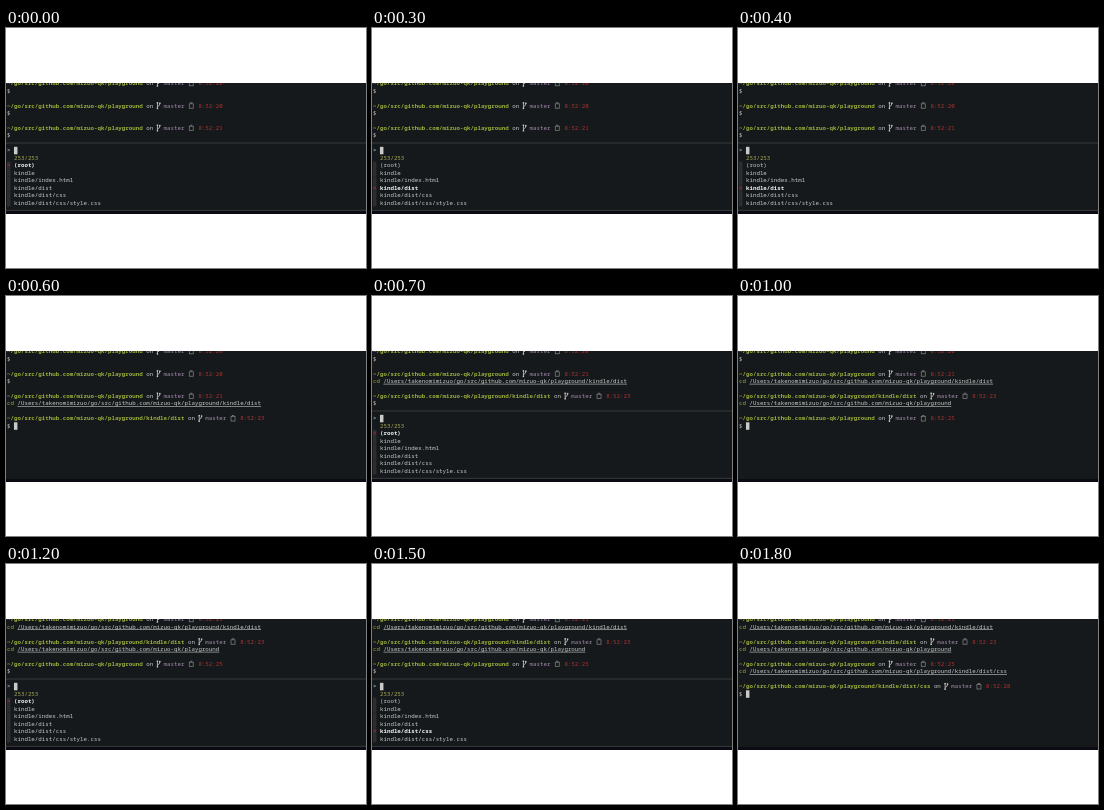
An HTML page with a canvas for the animation above (1.9 s loop, 360 by 240 pixels).

```html
<!DOCTYPE html>
<html lang="en">
<head>
<meta charset="utf-8">
<title>Directory picker in a terminal</title>
<style>
html, body { margin: 0; width: 100%; height: 100%; overflow: hidden; background: #fff; }
canvas { display: block; width: 360px; height: 240px; }
</style>
</head>
<body>
<canvas id="stage"></canvas>
<script>
const canvas = document.getElementById('stage');
const ctx = canvas.getContext('2d');
const ratio = window.devicePixelRatio || 1;
canvas.width = 360 * ratio;
canvas.height = 240 * ratio;

const LOOP = 1900, COL = 3.48, ROW = 7.47, LEFT = 1, TOP = 55, BOTTOM = 183;
const COLOR = {
  back: '#16191b', edge: '#0c0a12', text: '#c9cbca', white: '#f4f4f4',
  green: '#9bad3b', olive: '#a9aa55', purple: '#a58caf', red: '#b0332f',
  grey: '#858887', border: '#43484a', gutter: '#2b2e30', prompt: '#93aebd', pointer: '#b3263f'
};

const REPO = 'go/src/github.com/mizuo-qk/playground';
const HOME = '/Users/takenomimizuo/';
const ENTRIES = ['(root)', 'kindle', 'kindle/index.html', 'kindle/dist',
  'kindle/dist/css', 'kindle/dist/css/style.css'];

// Each prompt: folder below the repository, seconds, folder changed to.
const PROMPTS = [
  { dir: '', sec: 20 },
  { dir: '', sec: 20 },
  { dir: '', sec: 21, cd: '/kindle/dist' },
  { dir: '/kindle/dist', sec: 23, cd: '' },
  { dir: '', sec: 25, cd: '/kindle/dist/css' },
  { dir: '/kindle/dist/css', sec: 28 }
];

// pick is the selected entry; without it the picker is closed.
const STEPS = [
  { at: 0, first: 0, active: 2, pick: 0 },
  { at: 100, first: 0, active: 2, pick: 1 },
  { at: 200, first: 0, active: 2, pick: 2 },
  { at: 300, first: 0, active: 2, pick: 3 },
  { at: 600, first: 0, active: 3 },
  { at: 700, first: 1, active: 3, pick: 0 },
  { at: 1000, first: 1, active: 4 },
  { at: 1200, first: 2, active: 4, pick: 0 },
  { at: 1300, first: 2, active: 4, pick: 1 },
  { at: 1400, first: 2, active: 4, pick: 3 },
  { at: 1500, first: 2, active: 4, pick: 4 },
  { at: 1800, first: 2, active: 5 }
];

const xAt = col => LEFT + col * COL;
const yAt = row => 55.2 + row * ROW;

function box(x, y, w, h, color) {
  ctx.fillStyle = color;
  ctx.fillRect(x, y, w, h);
}

// Large type scaled down keeps fractional character widths.
function write(text, col, row, color, bold = false) {
  ctx.save();
  ctx.translate(xAt(col), yAt(row) + 2);
  ctx.scale(0.1, 0.1);
  ctx.font = `${bold ? 'bold ' : ''}58px "Noto Sans Mono", "DejaVu Sans Mono", monospace`;
  ctx.fillStyle = color;
  ctx.fillText(text, 0, 0);
  ctx.restore();
}

function cursor(row) {
  box(xAt(2), yAt(row) - 3.6, COL, ROW, COLOR.text);
}

function branchIcon(col, row) {
  const x = xAt(col), y = yAt(row);
  ctx.strokeStyle = COLOR.text;
  ctx.lineWidth = 0.8;
  ctx.beginPath();
  ctx.moveTo(x + 0.8, y - 3);
  ctx.lineTo(x + 0.8, y + 3);
  ctx.moveTo(x + 3.2, y - 2.4);
  ctx.quadraticCurveTo(x + 3.4, y + 0.2, x + 0.8, y + 1);
  ctx.stroke();
  for (const [dx, dy] of [[0.8, -2.8], [3.2, -2.4], [0.8, 2.8]]) {
    box(x + dx - 0.7, y + dy - 0.7, 1.4, 1.4, COLOR.text);
  }
}

function clockIcon(col, row) {
  const x = xAt(col), y = yAt(row);
  ctx.strokeStyle = COLOR.grey;
  ctx.lineWidth = 0.7;
  ctx.strokeRect(x + 0.6, y - 1.8, 4, 4.4);
  box(x + 1.4, y - 3.2, 2.4, 0.8, COLOR.grey);
}

function drawPrompt({ dir, sec, cd }, row, isActive) {
  const path = '~/' + REPO + dir, end = path.length;
  write(path, 0, row, COLOR.green, true);
  write('on', end + 1, row, COLOR.text);
  branchIcon(end + 4, row);
  write('master', end + 6, row, COLOR.purple);
  clockIcon(end + 13.2, row);
  write('8:52:' + sec, end + 16, row, COLOR.red);

  if (isActive || cd === undefined) {
    write('$', 0, row + 1, COLOR.text);
  } else {
    const target = HOME + REPO + cd;
    write('cd', 0, row + 1, COLOR.green);
    write(target, 3, row + 1, COLOR.text);
    box(xAt(3), yAt(row + 1) + 2.7, target.length * COL, 0.6, COLOR.text);
  }
}

function drawPicker(pick) {
  box(0, yAt(8) - 0.3, 360, 0.7, COLOR.border);
  box(0, yAt(17) - 0.3, 360, 0.7, COLOR.border);
  write('>', 0, 9, COLOR.prompt, true);
  cursor(9);
  write('253/253', 2, 10, COLOR.olive);
  ENTRIES.forEach((entry, i) => {
    const row = 11 + i, chosen = i === pick;
    box(LEFT, yAt(row) - ROW / 2, COL, ROW, COLOR.gutter);
    if (chosen) write('>', 0, row, COLOR.pointer, true);
    write(entry, 2, row, chosen ? COLOR.white : COLOR.text, chosen);
  });
}

function draw(time) {
  const step = STEPS.findLast(s => s.at <= time);
  ctx.setTransform(ratio, 0, 0, ratio, 0, 0);
  box(0, 0, 360, 240, '#fff');
  box(0, TOP, 360, BOTTOM - TOP, COLOR.back);
  box(0, BOTTOM, 360, 3, COLOR.edge);

  ctx.save();
  ctx.beginPath();
  ctx.rect(0, TOP, 360, BOTTOM - TOP);
  ctx.clip();
  for (let i = step.first; i <= step.active; i++) {
    drawPrompt(PROMPTS[i], (i - step.first) * 3, i === step.active);
  }
  if (step.pick === undefined) cursor((step.active - step.first) * 3 + 1);
  else drawPicker(step.pick);
  ctx.restore();
}

const start = performance.now();
function tick() {
  draw((performance.now() - start) % LOOP);
  requestAnimationFrame(tick);
}
tick();
</script>
</body>
</html>
```
